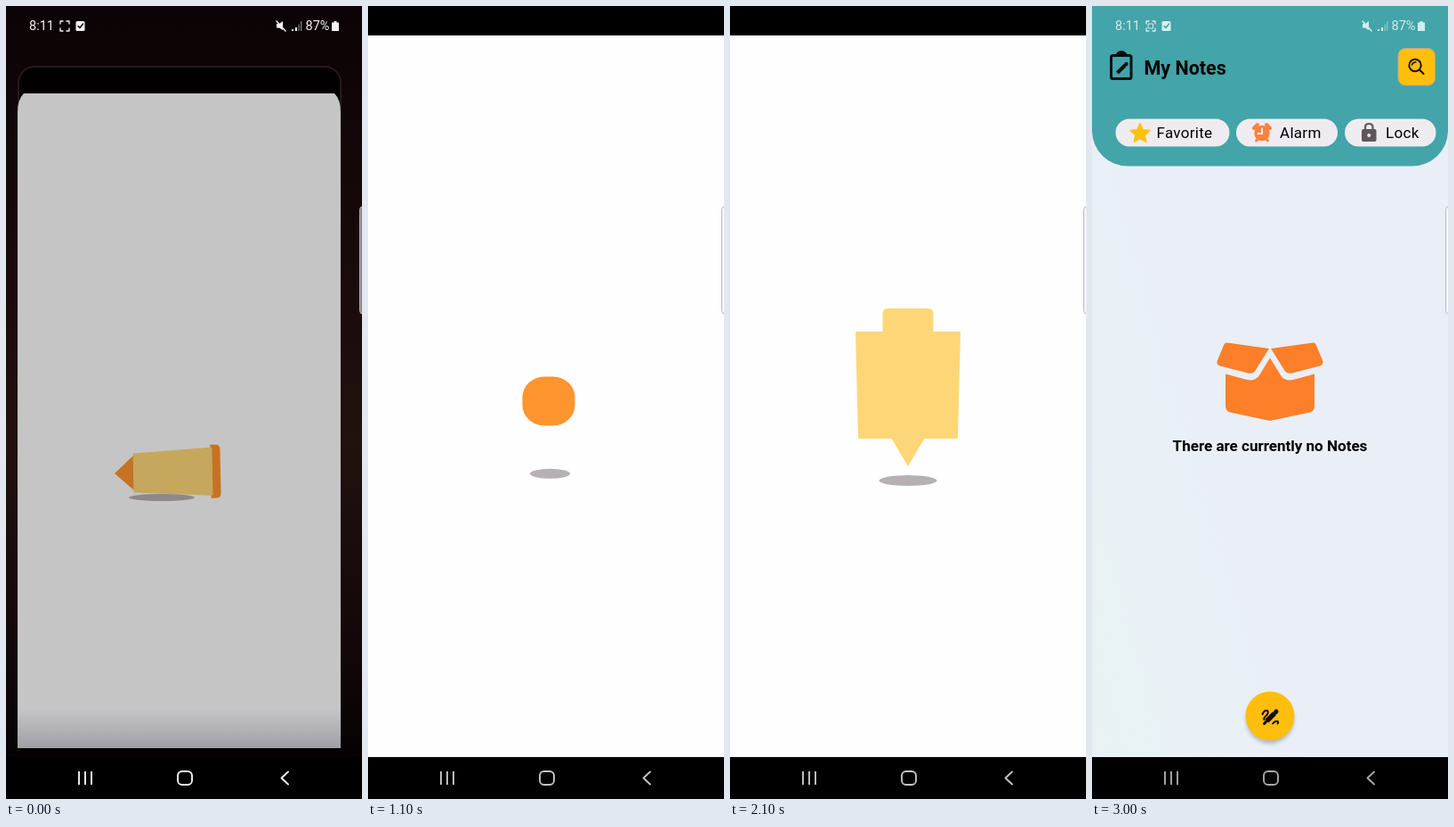
Animation, 400 px wide and 889 px high, one loop 3.1 s. Source, as an HTML page:

```html
<!DOCTYPE html>
<html lang="en">
<head>
<meta charset="utf-8">
<title>Notes app launch</title>
<style>
html, body { margin: 0; width: 100%; height: 100%; overflow: hidden; background: #000; }
svg { display: block; width: 100vw; height: 100vh; }
text { font-family: Roboto, sans-serif; }
.bold { font-weight: 700; }
.chip { font-size: 17px; letter-spacing: .3px; }
.status { font-size: 14.5px; }
.line { fill: none; stroke-linecap: round; stroke-linejoin: round; }
</style>
</head>
<body>
<svg viewBox="0 0 400 889" xmlns="http://www.w3.org/2000/svg">
  <defs>
    <linearGradient id="side" x1="0" y1="0" x2="0" y2="1">
      <stop offset="0" stop-color="#0b0305"/><stop offset=".35" stop-color="#1a0a0b"/>
      <stop offset=".55" stop-color="#21120f"/><stop offset=".8" stop-color="#140709"/>
      <stop offset="1" stop-color="#000"/>
    </linearGradient>
    <linearGradient id="foot" x1="0" y1="0" x2="0" y2="1">
      <stop offset="0" stop-color="#8a8892" stop-opacity="0"/><stop offset="1" stop-color="#8a8892" stop-opacity=".62"/>
    </linearGradient>
    <linearGradient id="page" x1="0" y1="1" x2="1" y2=".35">
      <stop offset="0" stop-color="#e8f3f4"/><stop offset=".45" stop-color="#eaeff7"/><stop offset="1" stop-color="#eaeef7"/>
    </linearGradient>
    <filter id="soft" x="-30%" y="-30%" width="160%" height="160%"><feGaussianBlur stdDeviation="2.2"/></filter>
    <mask id="reveal" maskUnits="userSpaceOnUse" x="100" y="300" width="200" height="220">
      <path id="sweep" class="line" stroke="#fff" stroke-width="42" pathLength="1" style="stroke-linecap:butt"
        d="M199 498C199 460 204 452 222 443C240 434 256 425 256 401C256 378 240 354 207 354C175 354 153 372 151 404L150 420"/>
    </mask>
    <clipPath id="window"><rect id="slot" width="400"/></clipPath>
  </defs>

  <rect width="400" height="889"/>
  <g id="home">
    <rect width="400" height="889" fill="url(#side)"/>
    <rect x="14" y="68" width="362" height="60" rx="18" fill="#030002" stroke="#26191c" stroke-width="2"/>
  </g>

  <g id="splash">
    <path id="paper" fill="#fefdff"/>
    <ellipse id="shade" fill="#b5b0b3"/>
    <path id="trail" class="line" stroke="#b7b0b2" stroke-width="5.2"
      d="M37 399C38 406 42 409 49 409L94 409C134 409 119 465 166 466C200 466 225 443 224 426C222 412 194 411 191 431C191 448 208 470 238 470C277 469 285 439 313 438C329 438 343 444 357 436"/>
    <g id="pencil">
      <path id="cap"/><path id="tip"/>
      <path id="barrel" fill="#fdd777" stroke="#fdd777" stroke-width="3" stroke-linejoin="round"/>
    </g>
    <g id="mark"><path mask="url(#reveal)" fill="#fdd777"
      d="M138 404C139 370 167 344 207 344C245 344 269 370 269 400C269 428 252 440 234 449C214 458 211 464 211 489L190 492C188 464 190 450 213 439C232 430 242 424 242 400C242 378 229 364 207 364C182 364 165 382 164 402L163 412Q162 416 154 416L147 416Q138 414 138 404Z"/></g>
    <rect id="ball" fill="#fe952f"/>
    <path id="dim"/>
    <rect id="haze" x="13" y="788" width="363" height="44" fill="url(#foot)"/>
  </g>

  <g id="app" clip-path="url(#window)">
    <rect width="400" height="889" fill="url(#page)"/>
    <rect width="400" height="60" fill="#f2eff1"/>
    <g id="content">
      <path fill="#43a4a9" d="M0 0H400V140A40 40 0 0 1 360 179.5H40A40 40 0 0 1 0 140Z"/>
      <g class="line" stroke="#0b0f10" stroke-width="3">
        <rect x="21.5" y="55.5" width="22.500" height="26" rx="2"/>
        <path d="M28.500 54.500Q33 49.500 37.500 54.500" stroke-width="4"/>
        <path d="M28.500 75L37 66.500" stroke-width="4" stroke-linecap="butt"/>
        <path d="M38 65.500L38.700 64.800" stroke-width="4"/>
      </g>
      <text class="bold" x="58.500" y="77" font-size="21.5">My Notes</text>
      <rect x="344" y="47.500" width="41.500" height="41.500" rx="8" fill="#ffbf0a" stroke="#b9a48f"/>
      <g class="line" stroke="#181204" stroke-width="2">
        <circle cx="363" cy="66.500" r="6.700"/><path d="M368 71.500L372.500 76"/>
        <path d="M359.500 66Q360.500 62.500 364 63" stroke-width="1.500"/>
      </g>
      <g fill="#eeecf0">
        <rect x="26.500" y="126.500" width="128" height="31" rx="15.500"/>
        <rect x="162" y="126.500" width="114" height="31" rx="15.500"/>
        <rect x="284" y="126.500" width="102.500" height="31" rx="15.500"/>
      </g>
      <path id="star" fill="#fcc20c" stroke="#fcc20c" stroke-width="1.500" stroke-linejoin="round"/>
      <g fill="none" stroke="#fb8140" stroke-linecap="round">
        <path d="M182 137L186 133M200 137L196 133" stroke-width="4"/>
        <path d="M184.500 151L187 148.500M197.500 151L195 148.500" stroke-width="3"/>
        <circle cx="191" cy="142.500" r="8" fill="#fb8140" stroke-width="1.500"/>
        <path d="M191 137.500V143H186.500" stroke="#fff" stroke-width="1.800"/>
      </g>
      <g fill="#5d575b">
        <path class="line" d="M307 139V136Q307 132 311 132Q315.500 132 315.500 136V139" stroke="#5d575b" stroke-width="2.200"/>
        <rect x="303" y="138" width="16.500" height="14" rx="2"/><circle cx="311.200" cy="145" r="2" fill="#eeecf0"/>
      </g>
      <text class="chip" x="72.500" y="148">Favorite</text>
      <text class="chip" x="211" y="148">Alarm</text>
      <text class="chip" x="330" y="148">Lock</text>
      <g fill="#fd7f2a">
        <path id="flap" d="M152 377.500L199 384L184 408Q181 413 175 411.500L144 403.500Q139 402 141 397L148 380.500Q149 377 152 377.500Z"/>
        <use href="#flap" transform="matrix(-1 0 0 1 400 0)"/>
        <path d="M150 412.500L174 419Q184 421 188 414L200 394.500L212 414Q216 421 226 419L250 412.500V448Q250 454 245 455.500L200 465L155 455.500Q150 454 150 448Z"/>
      </g>
      <text class="bold" x="200" y="499" font-size="17.050" text-anchor="middle">There are currently no Notes</text>
      <circle cx="200" cy="800" r="27" fill="#7d8290" opacity=".5" filter="url(#soft)"/>
      <circle cx="200" cy="796" r="27.500" fill="#ffbe0b"/>
      <g class="line" stroke="#110d02">
        <path d="M191.500 794C194 788 199 789 197.500 793C195.500 797 192 797.500 193.500 800M203 804.500C206 800.500 211 801 208.500 804.500" stroke-width="2"/>
        <path d="M196.500 801.500L205 793" stroke-width="5.500" stroke-linecap="butt"/>
        <path d="M206.500 791.500L207 791" stroke-width="5"/><path d="M193.500 804.500L197 801" stroke-width="3"/>
      </g>
    </g>
  </g>

  <rect id="dock" y="842" width="400" height="47"/>
  <g id="nav" class="line" stroke-width="1.900">
    <path d="M82 858V873M89 858V873M96 858V873" stroke-linecap="butt"/>
    <rect x="193" y="858" width="16" height="15" rx="4.800"/>
    <path d="M317 858.500L309.500 865.500L317 872.500"/>
  </g>
  <rect id="handle" x="397.500" y="224.500" width="12" height="121" rx="4" stroke="#b9b6bb"/>

  <g id="status">
    <text class="status" x="26" y="27">8:11</text>
    <path class="line" stroke="currentColor" stroke-width="1.300" d="M61 20V17H64M68 17H71V20M71 25V28H68M64 28H61V25"/>
    <rect id="lens" x="63.500" y="20" width="5" height="5" class="line" stroke="currentColor" stroke-width="1"/>
    <rect x="78.500" y="17" width="10" height="11" rx="1.500"/>
    <path id="tick" class="line" d="M81 22.500L83 24.500L86.500 20" stroke-width="1.500"/>
    <path d="M304 20H307L311 17V27L307 24.500H304Z"/>
    <path class="line" stroke="currentColor" stroke-width="1.500" d="M304 17L314 28"/>
    <path d="M321 28V26H323V28ZM325 28V24H327V28Z"/>
    <path d="M328.500 28V20.500H329.800V28ZM331 28V17H332.300V28Z" opacity=".5"/>
    <text class="status" x="336.500" y="27">87%</text>
    <path d="M368.500 17H371.500V18.500H374V28H366V18.500H368.500Z"/>
  </g>
</svg>
<script>
const LOOP = 3100, STEP = 100;
const $ = id => document.getElementById(id);
const set = (id, attrs) => { for (const k in attrs) $(id).setAttribute(k, attrs[k]); };
const show = (id, on) => set(id, { visibility: on ? 'visible' : 'hidden' });
const clamp = v => Math.max(0, Math.min(1, v));
const mix = (a, b, p) => a + (b - a) * p;
const ease = p => p * p * (3 - 2 * p);

// Rows: time, then values. Eased between rows, held outside them.
function at(rows, t) {
  let i = 0;
  while (i < rows.length - 2 && t >= rows[i + 1][0]) i++;
  const [a, b] = [rows[i], rows[i + 1]];
  const p = ease(clamp((t - a[0]) / (b[0] - a[0])));
  return a.slice(1).map((v, k) => mix(v, b[k + 1], p));
}

// time, tip x, tip y, angle, tip length, tip width, barrel length, front, back, cap length, cap width
const PENCIL = [
  [0, 122, 524, -1.2, 21, 40, 89, 44, 54, 9, 60],
  [200, 37, 399, -62, 18, 33, 57, 34, 35, 13, 27],
  [600, 359, 437, -126.5, 18, 34, 57, 34, 35, 13, 27],
  [1000, 206, 470, -90, 8, 24, 32, 38, 40, 8, 30]
];
const BLOCK = [
  [1800, 200, 500, -90, 6, 34, 84, 160, 170, 8, 80],
  [2100, 200, 516, -90, 31, 38, 120, 112, 118, 26, 57]
];
// time, centre x, centre y, rx, ry
const SHADE = [
  [0, 175, 551, 37, 4], [200, 190, 526, 44, 5], [600, 204, 524.5, 55, 5],
  [1100, 204.5, 524.3, 22.5, 5.5], [1400, 201, 537, 25, 8],
  [1700, 201, 537, 25, 8], [2100, 200, 532, 32.5, 6]
];
// time, centre x, centre y, width, height
const BALL = [
  [1000, 204, 447, 46, 42], [1100, 203, 443, 59, 55], [1300, 200, 518, 34, 32],
  [1400, 200, 524, 28, 28], [1700, 200, 524, 28, 28], [1800, 200, 512, 12, 12]
];

const trail = $('trail'), trailLen = trail.getTotalLength();

function drawPencil(row, tint) {
  const [x, y, ang, tl, tw, bl, w1, w2, cl, cw] = row;
  const end = tl + bl, top = end + cl, h = cw / 2, r = Math.min(6, cl * .6);
  set('pencil', { transform: `translate(${x} ${y}) rotate(${ang})` });
  set('tip', { d: `M0 0L${tl + 1} ${-tw / 2}V${tw / 2}Z`, fill: tint });
  set('barrel', { d: `M${tl + 1.5} ${1.5 - w1 / 2}L${end - 1.5} ${1.5 - w2 / 2}V${w2 / 2 - 1.5}L${tl + 1.5} ${w1 / 2 - 1.5}Z` });
  set('cap', {
    d: `M${end - 2} ${-h}H${top - r}Q${top} ${-h} ${top} ${r - h}V${h - r}Q${top} ${h} ${top - r} ${h}H${end - 2}Z`,
    fill: tint
  });
}

function drawWindow(t) {
  const p = ease(clamp(t / 150)), x = mix(13, 0, p), r = mix(376, 400, p);
  const y = mix(98, 33, p), b = mix(832, 842, p), c = mix(7, 0, p);
  const d = `M${x} ${b}V${y + 3 * c}Q${x} ${y + c} ${x + c} ${y}H${r - c}Q${r} ${y + c} ${r} ${y + 3 * c}V${b}Z`;
  set('paper', { d });
  set('dim', { d, opacity: mix(.225, 0, p) });
  set('haze', { opacity: 1 - p });
  set('home', { opacity: 1 - p });
}

function drawSplash(t) {
  drawWindow(t);
  const [sx, sy, rx, ry] = at(SHADE, t);
  set('shade', { cx: sx, cy: sy, rx, ry });

  const drawn = clamp((t - 200) / 400), wiped = ease(clamp((t - 600) / 350));
  const len = (drawn - wiped) * trailLen;
  show('trail', len > 1);
  set('trail', { 'stroke-dasharray': `0 ${wiped * trailLen} ${Math.max(0, len)} ${trailLen * 2}` });

  const late = t >= 1800;
  const row = at(late ? BLOCK : PENCIL, t);
  if (t >= 200 && t <= 600) {
    const pt = trail.getPointAtLength(drawn * trailLen);
    row[0] = pt.x + 2 * drawn;
    row[1] = pt.y + drawn;
  }
  drawPencil(row, late ? '#fdd777' : '#fe932e');
  show('pencil', t < 1000 || late);

  const [bx, by, bw, bh] = at(BALL, t);
  set('ball', { x: bx - bw / 2, y: by - bh / 2, width: bw, height: bh, rx: bw * .42, ry: bh * .42 });
  show('ball', t >= 1000 && t < 1900);

  const grow = ease(clamp((t - 1200) / 250)), s = 1 + .16 * ease(clamp((t - 1550) / 200));
  set('sweep', { 'stroke-dasharray': `${grow} 2` });
  set('mark', { transform: `translate(200 430) scale(${s} ${2 - s}) translate(-200 -430)` });
  show('mark', t > 1200 && t < 1800);
}

function drawApp(t) {
  const settled = t >= 2500, open = t >= 2200;
  const top = settled ? 0 : at([[2200, 22], [2300, 10], [2400, 6]], t)[0];
  const gap = settled ? 0 : at([[2200, 28], [2300, 13], [2400, 0]], t)[0];
  show('app', open);
  set('app', { opacity: clamp(.6 + (t - 2200) / 250) });
  set('slot', { y: top, height: 889 - top - gap });
  set('content', { transform: `translate(0 ${settled ? 0 : 33})` });
  show('dock', !open || settled);
  set('nav', { stroke: t < 100 ? '#f4f2f4' : settled ? '#aaa6ab' : open ? '#f8fbfe' : '#c6c2c7' });
  set('handle', { fill: t < 100 ? '#8b878a' : '#f8f7fb' });
  const ink = settled ? '#d5edef' : '#f6f4f6';
  set('status', { fill: ink, color: ink, opacity: settled ? 1 : 1 - clamp(t / 200) });
  set('tick', { stroke: settled ? '#43a4a9' : '#0b0305' });
  set('lens', { opacity: settled ? 1 : 0 });
}

function render(ms) {
  const t = Math.floor((ms % LOOP) / STEP) * STEP;
  drawSplash(t);
  drawApp(t);
}

const star = Array.from({ length: 10 }, (_, i) => {
  const r = i % 2 ? 5.4 : 11.5, a = (i * 36 - 90) * Math.PI / 180;
  return `${54 + r * Math.cos(a)} ${143 + r * Math.sin(a)}`;
});
set('star', { d: `M${star.join('L')}Z` });

const start = performance.now();
function tick(now) {
  render(Math.max(0, now - start));
  requestAnimationFrame(tick);
}
render(0);
requestAnimationFrame(tick);
</script>
</body>
</html>
```
